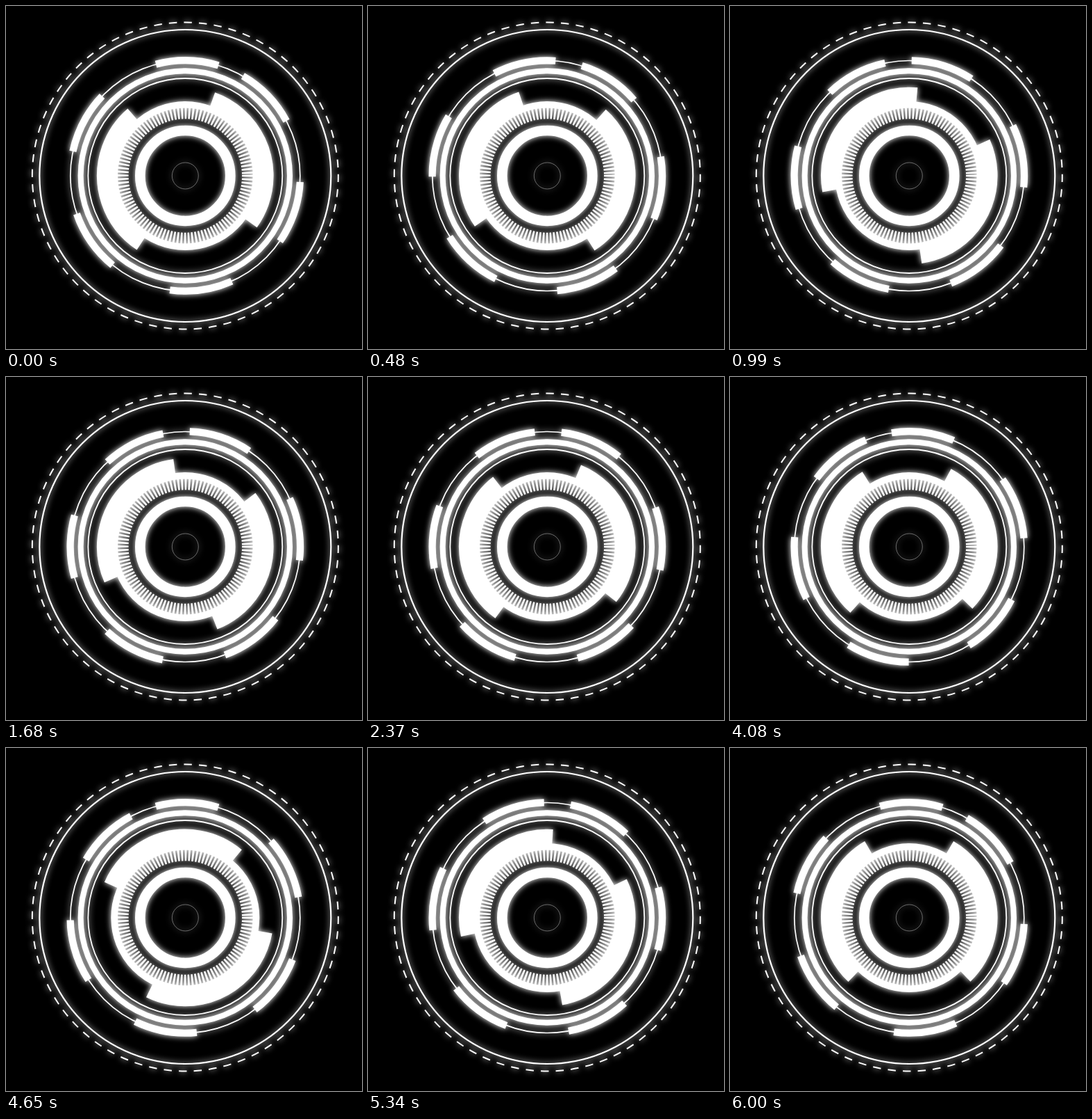
Write an HTML page that moves like this. It is 513x493 px and loops after 6.03 s.

```html
<!DOCTYPE html>
<html>
<head>
<meta charset="utf-8">
<style>
  html, body { margin: 0; height: 100%; overflow: hidden; background: #000; }
  svg { display: block; width: 513px; height: 493px; }
  circle { fill: none; stroke: #fff; }
</style>
</head>
<body>
<svg viewBox="0 0 513 493">
  <g style="filter: drop-shadow(0 0 4px #fff)">
    <g id="dial" transform="translate(258.3 244)"></g>
  </g>
</svg>
<script>
const LOOP = 6030;
const dial = document.getElementById('dial');

// Dash lengths are given in degrees of arc.
function ring(r, width, dash, turn = 0) {
  const c = document.createElementNS('http://www.w3.org/2000/svg', 'circle');
  c.setAttribute('r', r);
  c.setAttribute('stroke-width', width);
  if (dash) {
    const unit = r * Math.PI / 180;
    c.setAttribute('stroke-dasharray', dash.map(d => d * unit).join(' '));
  }
  c.setAttribute('transform', `rotate(${turn})`);
  dial.append(c);
  return c;
}

const dashes = (count, fill) => [360 / count * fill, 360 / count * (1 - fill)];

ring(220.5, 2, dashes(64, 0.53), -0.6);
ring(210, 2.2);
ring(165.5, 1.7);
const segments = ring(165.7, 10.2, [31.5, 31.5]);
ring(150.7, 8);
ring(140, 1.8);
const blades = ring(116.5, 21.5, [106, 87.5]);
ring(102.2, 9.6);
ring(90, 16.5, dashes(108, 0.52), -0.85);
ring(65, 14.6);
ring(19, 0.6).style.stroke = '#aaa';

// Swing poses: time in ms, angle in degrees.
const times = [0, 990, 2370, 3210, 4080, 4650, 6000];
const bladePoses = [-70.3, -24.2, -67.5, -131.2, -61.7, 10.2, -59.9];
const segmentPoses = [-59.9, -88.8, -82.9, -85.7, -98.8, -104.8, -59.9];

function slope(poses, i) {
  const last = times.length - 1;
  if (i === 0 || i === last) return 0;
  return (poses[i + 1] - poses[i - 1]) / (times[i + 1] - times[i - 1]);
}

// Smooth cubic curve through the poses.
function swing(poses, t) {
  if (t >= times.at(-1)) return poses.at(-1);
  const i = times.findIndex(x => x > t) - 1;
  const span = times[i + 1] - times[i];
  const u = (t - times[i]) / span, v = 1 - u;
  return poses[i] * v * v * (1 + 2 * u) + poses[i + 1] * u * u * (3 - 2 * u)
    + span * u * v * (slope(poses, i) * v - slope(poses, i + 1) * u);
}

const start = performance.now();

function draw() {
  const t = Math.floor((performance.now() - start) % LOOP / 30) * 30;
  blades.setAttribute('transform', `rotate(${swing(bladePoses, t)})`);
  segments.setAttribute('transform', `rotate(${swing(segmentPoses, t)})`);
  requestAnimationFrame(draw);
}
draw();
</script>
</body>
</html>
```
